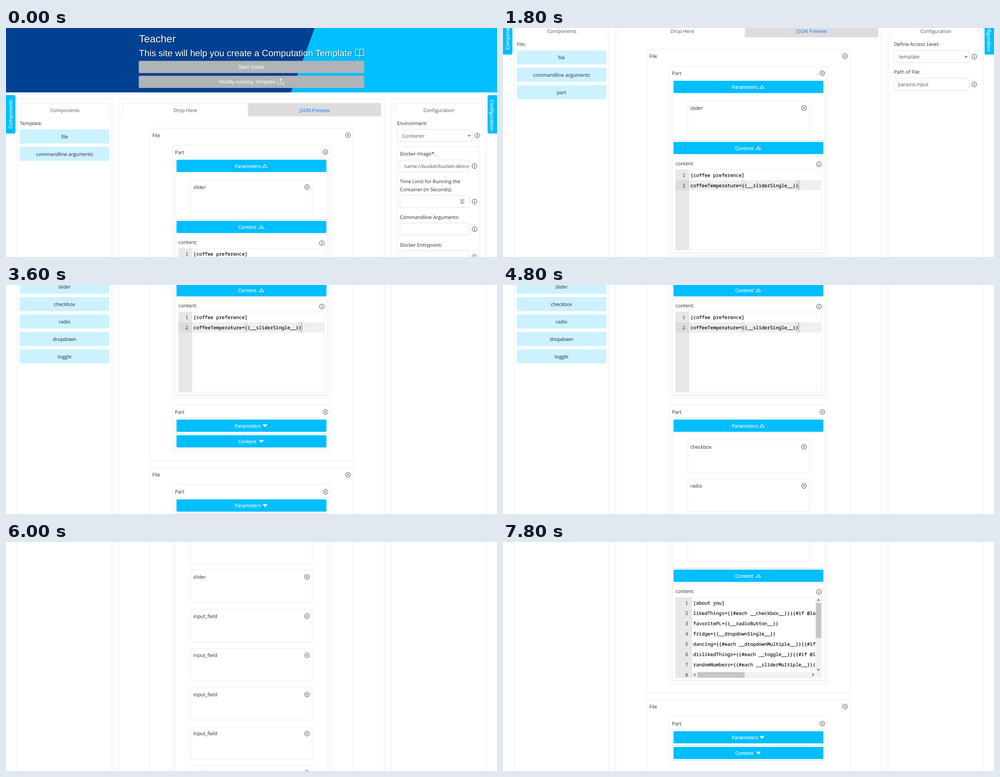
Write an HTML page that moves like this. It is 1093x512 px and loops after 8000 ms.

```html
<!DOCTYPE html>
<html lang="en">
<head>
<meta charset="utf-8">
<title>Template editor</title>
<style>
html, body { margin: 0; width: 100%; height: 100%; overflow: hidden; background: #fff; }
svg { display: block; width: 100vw; height: 100vh; }
text { font: 10.85px "Open Sans", sans-serif; fill: #212529; white-space: pre; text-rendering: geometricPrecision; }
.gray { fill: #495057; }
.link { fill: #007bff; }
.white { fill: #fff; stroke: #fff; stroke-width: .2; }
.code { font: 10.55px "Noto Sans Mono", monospace; fill: #000; stroke: #000; stroke-width: .15; }
.num { font: 10.55px "Noto Sans Mono", monospace; fill: #333; text-anchor: end; }
.mid { text-anchor: middle; }
.head { font-family: "Liberation Sans", sans-serif; fill: #fff; }
.shadow { filter: drop-shadow(1px 1px 1px rgba(0, 0, 0, .5)); }
.box { fill: none; stroke: #e9e9e9; }
.input { fill: #fff; stroke: #d9dde1; }
.icon { fill: none; stroke: #222; stroke-width: .9; }
.line { fill: none; stroke: #fff; stroke-width: 1.2; stroke-linejoin: round; }
</style>
</head>
<body>
<svg id="stage" viewBox="0 0 1093 512" preserveAspectRatio="none"></svg>
<script>
const CYAN = '#00beff', STEP = 600, LOOP = 8000, GAP = 87.55, BODY = 217.5;
const stage = document.getElementById('stage');

const text = (x, mid, s, cls = '', more = '') =>
  `<text x="${x}" y="${mid + 3.9}" class="${cls}" ${more}>${s}</text>`;
const rect = (x, y, x2, y2, look, r = 0) =>
  `<rect x="${x}" y="${y}" width="${x2 - x}" height="${y2 - y}" rx="${r}" ${look}/>`;
const fill = c => `fill="${c}"`;
const BOX = 'class="box"', INPUT = 'class="input"';
const path = (d, cls = 'icon', more = '') => `<path d="${d}" class="${cls}" ${more}/>`;
const circle = (x, y) => `<circle cx="${x}" cy="${y}" r="5.4" class="icon"/>`;
const close = (x, y) =>
  circle(x, y) + path(`M${x - 2.4} ${y - 2.4}l4.8 4.8m0 -4.8l-4.8 4.8`);
const info = (x, y) => circle(x, y) +
  path(`M${x + .5} ${y - 1.2}l-.8 4.2m1.1 -6.2l-.1 .9`, 'icon', 'style="stroke-width:1.2"');
const chevron = (x, y, dx, dy, color = '#444') => path(
  `M${x - dy * 2.6 - dx * 1.4} ${y - dx * 2.6 - dy * 1.4}L${x + dx * 1.4} ${y + dy * 1.4}` +
  `L${x + dy * 2.6 - dx * 1.4} ${y + dx * 2.6 - dy * 1.4}`, 'icon', `style="stroke:${color};stroke-width:1.3"`);

function header() {
  return rect(0, 0, 1093, 144, fill('#004191')) +
    `<path d="M687 0H1093V144H634.5Z" fill="${CYAN}"/>` +
    '<g class="shadow"><text x="296" y="32" class="head" style="font-size:23px">Teacher</text>' +
    '<text x="296" y="62.5" class="head" style="font-size:20.1px">This site will help you create a Computation Template</text>' +
    path('M787.3 49.5C785 46.5 781 46.5 777.8 47.5V62.5C781 61.2 785 61.2 787.3 63.5C789.6 61.2 793.6 61.2 796.8 62.5V47.5C793.6 46.5 789.6 46.5 787.3 49.5V63.5', 'line') + '</g>' +
    rect(295.5, 73.5, 797.5, 100.7, fill('#b1b3b6'), 2) +
    rect(295.5, 106.7, 797.5, 133.9, fill('#b1b3b6'), 2) +
    '<text x="546.3" y="91" class="head mid" style="font-size:11.5px">Start Guide</text>' +
    '<text x="474.5" y="124.3" class="head" style="font-size:11.5px">Modify existing Template</text>' +
    path('M604.5 120.5V125.5H618V120.5M611.2 122.5V113.8M608 117L611.2 113.8L614.4 117', 'line');
}

function panel(x, x2, tab, tab2, title, end = tab2) {
  return rect(x, 159, x2, 4000, BOX, 3) +
    path(`M${x} 197.5H${tab}V171q0 -3 3 -3H${tab2 - 3}q3 0 3 3V197.5M${end} 197.5H${x2}`, 'box') +
    text((tab + tab2) / 2, 183.7, title, 'gray mid');
}

function sideTab(x, mid, turn, s) {
  return rect(x, 150, x + 25, 236, fill(CYAN), 4) +
    `<g transform="translate(${mid} ${turn < 0 ? 192.5 : 195}) rotate(${turn})">${text(0, 0, s, 'white mid')}</g>`;
}

const lists = {
  Template: ['file', 'commandline arguments'],
  File: ['file', 'commandline arguments', 'part'],
  Part: ['file', 'commandline arguments', 'part', 'input_field', 'editor',
    'slider', 'checkbox', 'radio', 'dropdown', 'toggle']
};
const components = kind => text(31, 212.8, kind + ':') + lists[kind].map((s, i) => {
  const y = 226.6 + i * 38.9;
  return rect(30.5, y, 229.8, y + 31.5, fill('#ccf2ff')) + text(130.3, y + 16.2, s, 'mid');
}).join('');

const select = (y, label, value) => text(870.5, y, label) +
  rect(870.5, y + 13.8, 1037.5, y + 41, INPUT, 3) + text(882, y + 28, value, 'gray') +
  chevron(1031, y + 27.6, 0, 1) + info(1049, y + 27.5);
const wideInput = (y, label, value) => text(870.5, y, label) +
  rect(870.5, y + 14, 1037.5, y + 41, INPUT, 3) + text(879.5, y + 28, value, 'gray') + info(1049, y + 27.8);
const input = (y, label, value = '') => text(876.8, y, label) +
  rect(877, y + 13.5, 1031, y + 40.5, INPUT, 3) + text(886, y + 27.8, value, 'gray') + info(1043, y + 27.2);

function configuration(kind) {
  if (kind === 'File')
    return select(213, 'Define Access Level:', 'template') + wideInput(274.8, 'Path of File:', 'params.input');
  if (kind === 'Part')
    return select(213, 'Define Access Level:', 'template') +
      wideInput(274.8, 'Additional Description of Part:', 'Parameter in part');
  return select(213, 'Environment:', 'Container') + rect(870.5, 265.5, 1054.5, 900, BOX) +
    input(281.5, 'Docker-Image*:', 'name://bucket/bucket-demo') +
    text(876.8, 343.3, 'Time Limit for Running the') + input(360.7, 'Container (in Seconds):') +
    rect(1009.5, 381, 1022, 394.5, fill('#e9e9e9')) +
    chevron(1015.7, 385, 0, -1, '#777') + chevron(1015.7, 390.8, 0, 1, '#777') +
    input(422.6, 'Commandline Arguments:') + input(484.6, 'Docker Entrypoint:') +
    text(876.8, 546.2, 'RegEx-Pattern for Intermediate') + text(876.8, 563.6, 'Result Files:') +
    text(894, 586.6, 'How many Patterns') + text(894, 603.8, 'should there be?') +
    rect(894.5, 617.5, 1014, 644.5, INPUT, 3) + path('M937.5 621V641M970.5 621V641', 'box') +
    path('M912 631.5h8M988 631.5h8m-4 -4v8') + text(954, 631.5, '0', 'gray mid') +
    info(1043, 613.8) + input(671.5, 'User-Id:');
}

const cards = (y, names) => names.map((s, i) => {
  const top = y + i * GAP;
  return rect(411, top, 682, top + 72.7, BOX) + text(417, top + 15.7, s) + close(670, top + 15.6);
}).join('');

function bar(y, x, label, open, tip) {
  const m = y + 13.7;
  return rect(379.5, y, 713.3, y + 27.4, fill(CYAN), 2) + text(x, m + .4, label, 'white') +
    (open ? path(`M${tip - 5} ${m + 3.2}H${tip + 5}L${tip} ${m - 3.2}Z`, 'line')
          : `<path d="M${tip - 5.6} ${m - 3}H${tip + 5.6}L${tip} ${m + 3.6}Z" fill="#fff"/>`);
}

const row = (y, i) => y + 43 + i * 23;
const coffee = y =>
  rect(384, y + 31, 709, y + 210.5, BOX) + rect(384, y + 31, 414.5, y + 210.5, fill('#e5e7e8')) +
  rect(384, y + 54.3, 414.5, y + 77.2, fill('#d9dbdc')) + rect(414.5, y + 54.3, 708.5, y + 77.2, fill('#efefef')) +
  ['[coffee preference]', 'coffeeTemperature={{__sliderSingle__}}'].map((s, i) =>
    text(405.5, row(y, i), i + 1, 'num') + text(417.3, row(y, i), s, 'code')).join('') +
  [531.5, 652].map(x => rect(x, y + 55, x + 5.8, y + 76.5, 'fill="none" stroke="#c4c4c4"', 2)).join('') +
  path(`M658.7 ${y + 55.5}v21`, 'icon', 'style="stroke:#888"');

const aboutLines = ['[about you]', 'likedThings={{#each __checkbox__}}{{#if @last}}',
  'favoritePL={{__radioButton__}}', 'fridge={{__dropdownSingle__}}',
  'dancing={{#each __dropdownMultiple__}}{{#if @last}}',
  'dislikedThings={{#each __toggle__}}{{#if @last}}',
  'randomNumbers={{#each __sliderMultiple__}}{{#if @last}}', ''];
const about = y =>
  `<clipPath id="pane"><rect x="384" y="${y + 31}" width="312" height="179.5"/></clipPath>` +
  rect(384, y + 31, 709, y + 210.5, BOX) + rect(384, y + 31, 421, y + 210.5, fill('#e8e8e8')) +
  '<g clip-path="url(#pane)">' + aboutLines.map((s, i) =>
    text(412, row(y, i), i + 1, 'num') + text(423.6, row(y, i), s, 'code')).join('') + '</g>' +
  rect(696, y + 31, 709, y + 198, fill('#f1f1f1')) + rect(421, y + 198, 709, y + 210.5, fill('#f1f1f1')) +
  rect(696.3, y + 43.5, 708.5, y + 121.5, fill('#c6c6c6')) + rect(433, y + 198, 538, y + 210.5, fill('#c6c6c6')) +
  chevron(702.3, y + 37, 0, -1) + chevron(702.3, y + 192.5, 0, 1) +
  chevron(427, y + 204, -1, 0) + chevron(690, y + 204, 1, 0);

// Draws one part and returns its bottom edge along with the markup.
function part(y, names, editor) {
  const split = y + (names ? 78 + names.length * GAP : 64), low = split + 34.6;
  const end = low + (editor ? BODY : 0), bottom = end + 6.5;
  const frame = (a, b) => rect(376.5, a, 716.5, b, BOX, 2) +
    path(`M377.5 ${b + .3}H715.5`, 'icon', 'style="stroke:#dadada"');
  let s = rect(370.5, y, 722.5, bottom, BOX) + text(376.3, y + 15.6, 'Part') + close(711, y + 15.6) +
    frame(y + 29.5, split) + frame(split + 1, end) +
    bar(y + 32.6, 509.3, 'Parameters', names, 576.4) + bar(split + 3.6, 517, 'Content', editor, 568.5);
  if (names) s += path(`M377 ${y + 63}H716`, 'box') + cards(y + 78, names);
  if (editor) s += path(`M377 ${low}H716`, 'box') + text(384, low + 17.2, 'content:') +
    info(703.2, low + 19) + editor(low);
  return { s, bottom };
}

function file(y, parts) {
  let at = y + 38, s = '';
  for (const [names, editor] of parts) {
    const p = part(at, names, editor);
    s += p.s;
    at = p.bottom + 15;
  }
  const bottom = at + 5.5;
  return { s: rect(320, y, 773, bottom, BOX) + text(325.8, y + 15.6, 'File') + close(761.3, y + 15.5) + s, bottom };
}

const answers = ['checkbox', 'radio', 'dropdown', 'dropdown', 'toggle', 'slider',
  'input_field', 'input_field', 'input_field', 'input_field', 'radio', 'radio'];

function page(kind, open, editor) {
  const first = file(224, [[['slider'], coffee], [open && answers, editor && about]]);
  return header() + panel(25, 236, 34, 228.5, 'Components') +
    panel(251, 842, 260, 538, 'Drop Here', 835) + panel(857.5, 1068.5, 866.5, 1060.5, 'Configuration') +
    rect(539, 167.5, 835, 197.5, fill('#dddddd'), 2) + text(687, 183.7, 'JSON Preview', 'link mid') +
    components(kind) + configuration(kind) + first.s + file(first.bottom + 15, [[null, null]]).s +
    sideTab(-4, 10, -90, 'Components') + sideTab(1072, 1082, 90, 'Configuration');
}

const arrow = ([x, y]) =>
  `<path d="M${x + .5} ${y + .5}v16.5l3.8 -3.6l2.5 5.8l2.6 -1.1l-2.5 -5.7h5.2Z" fill="#fff" stroke="#000"/>`;

// Each step changes only the listed properties; the pointer shows for one step.
const steps = [
  { scroll: 0, kind: 'Template', open: false, editor: false }, { scroll: 176.5 },
  { pointer: [462, 56] }, { kind: 'File' },
  { pointer: [476, 89] }, { kind: 'Part' }, { scroll: 433 },
  { pointer: [607, 304] }, { open: true },
  { scroll: 771.1 }, { scroll: 1154.3 }, { scroll: 1554 },
  { pointer: [599, 281] }, { scroll: 1554 + BODY, editor: true }
];
let shown = -1;

function draw(now) {
  const n = Math.floor(now % LOOP / STEP);
  if (n !== shown) {
    shown = n;
    const { pointer } = steps[n];
    const { scroll, kind, open, editor } = Object.assign({}, ...steps.slice(0, n + 1));
    stage.innerHTML = `<g transform="translate(0 ${-scroll})">${page(kind, open, editor)}</g>` +
      (pointer ? arrow(pointer) : '');
  }
  requestAnimationFrame(t => draw(Math.max(0, t - start)));
}
const start = performance.now();
draw(0);
</script>
</body>
</html>
```
